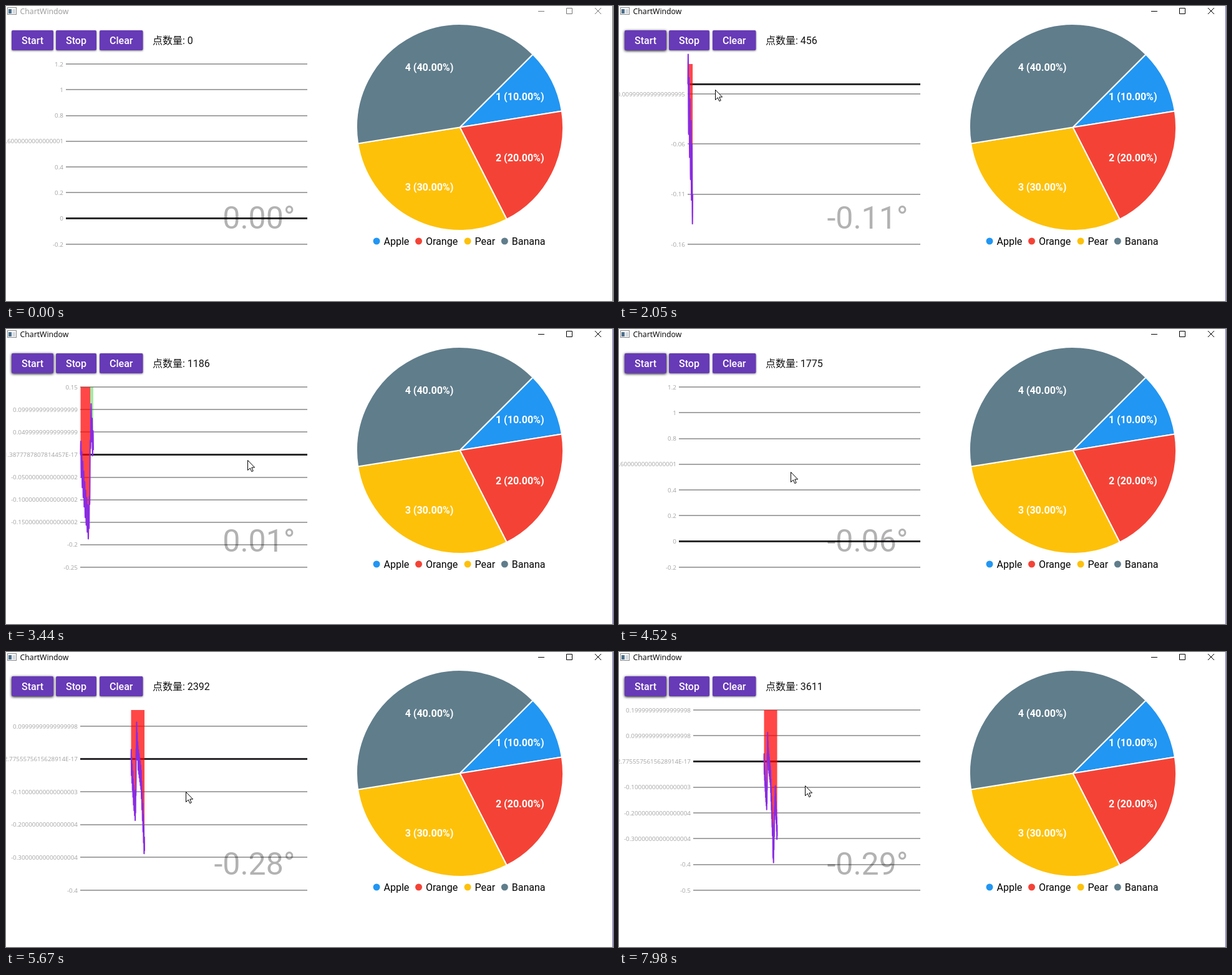
An HTML page for the animation above (8 s loop, 973 px wide and 473 px high).

```html
<!DOCTYPE html>
<html lang="en">
<head>
<meta charset="utf-8">
<title>ChartWindow</title>
<style>
html, body { margin: 0; width: 100%; height: 100%; overflow: hidden; background: #fff; }
svg { display: block; font: 16px Roboto, "Noto Sans CJK SC", "Noto Sans CJK", sans-serif; }
.ui { font-family: "Open Sans", "Noto Sans", sans-serif; }
.btn rect { fill: #673ab7; filter: drop-shadow(0 1px 1.5px rgba(0,0,0,.5)); }
.btn.hot rect { filter: drop-shadow(0 1px 2px rgba(0,0,0,.95)); }
.btn text { fill: #fff; font-weight: 500; text-anchor: middle; }
#title { font-size: 12.3px; }
#grid text { font-size: 9.85px; fill: #a3a3a3; text-anchor: end; }
#angle { font-size: 50px; fill: rgba(0,0,0,.3); text-anchor: end; }
#pie path { stroke: #fff; stroke-width: 2; stroke-linejoin: round; }
#pie .share { fill: #fff; font-weight: 700; text-anchor: middle; }
</style>
</head>
<body>
<svg width="973" height="473" viewBox="0 0 973 473">
  <rect x="2.5" y="2.5" width="14" height="11" fill="#fff" stroke="#858585"/>
  <rect x="4" y="5" width="5" height="7" fill="#4a6f8c"/>
  <rect x="10" y="5" width="5" height="7" fill="#d5dbe0"/>
  <text id="title" class="ui" x="22.5" y="13">ChartWindow</text>
  <path id="caption" fill="none" d="M853 8.5h10M898.5 3.5h9v9h-9zM944 3l10 10M954 3l-10 10"/>
  <path id="edge" d="M972.5 0V473"/>
  <g id="buttons"></g>
  <text id="count" x="235" y="61" fill="#111"></text>
  <g id="grid" class="ui"></g>
  <path id="fall" fill="rgba(255,0,0,.72)"/>
  <path id="rise" fill="rgba(0,190,0,.35)"/>
  <path id="line" fill="none" stroke="#8a2be2" stroke-width="2" stroke-linejoin="round"/>
  <text id="angle" x="463.5" y="356.5"></text>
  <g id="pie"></g>
  <path id="cursor" d="M.5 .5V16.5L4.3 13L6.8 18.6L9.2 17.5L6.8 12H11.6Z" fill="#fff" stroke="#000"/>
</svg>
<script>
const $ = id => document.getElementById(id);
const LOOP = 8000, FIRST = 290, STEP = 77, START = 1190;
const TOP = 93, BOTTOM = 382, RIGHT = 483;

// Time, point count, cursor x and y
const poses = [
  [290, 0, 771, 415], [980, 0, 46, 58], [START, 0, 46, 58], [2051, 456, 154, 134], [3437, 1186, 387, 210],
  [4515, 1775, 275, 229], [5670, 2392, 288, 224], [6594, 2880, 294, 220], [7980, 3611, 298, 214]
];

// Time and angle at the turning points of the trend
const trend = [
  [START, 0], [2051, -.11], [2690, -.164], [3010, .085], [3437, .01], [4515, -.06],
  [5670, -.28], [5960, -.394], [6594, -.22], [7000, -.12], [7980, -.29]
];

// Linear between rows; the swing fades to zero at each row
function at(rows, t, col = 1, swing = 0) {
  let i = 1;
  while (i < rows.length - 1 && rows[i][0] < t) i++;
  const a = rows[i - 1], b = rows[i], span = b[0] - a[0];
  const u = Math.min(1, Math.max(0, (t - a[0]) / span));
  return a[col] + (b[col] - a[col]) * u + swing * Math.sin(u * Math.PI * Math.round(span / 90));
}
const value = t => at(trend, t, 1, .035);

// Vertical scale; the labels come from repeated addition, rounding errors included
function scale(left, min, max, step) {
  const unit = (BOTTOM - TOP) / (max - min), y = v => BOTTOM - (v - min) * unit;
  const ticks = [];
  for (let v = min; v < max + step / 100; v += step) ticks.push(v);
  return { left, y, ticks };
}
const idle = scale(96, -.2, 1.2, .2);
const tight = scale(110, -.16, .02, .05);
const mid = scale(119, -.25, .1, .05);
const wide = scale(119, -.25, .15, .05);
const deep = scale(119, -.4, .15, .1);
const deeper = scale(119, -.5, .2, .1);

// From time, scale, x of the first point, pixels per ms (none: empty plot)
const views = [
  [0, idle], [1250, tight, 110.5, .0088], [2300, mid, 119.5, .0091], [2980, wide, 119.5, .0091],
  [4100, idle], [4900, deep, 200.5, .0048], [5900, deeper, 200.5, .0048],
  [6290, deeper, 245.5, .0025], [7440, deeper, 232.5, .0031]
];

function drawGrid({ left, y, ticks }) {
  const rule = (py, color, w) => `<path d="M${left} ${py}H${RIGHT}" stroke="${color}" stroke-width="${w}"/>`;
  $("grid").innerHTML = ticks.map(v =>
    rule(Math.round(y(v)), "#a5a5a5", 2) +
    `<text x="${left - 4}" y="${y(v) + 3.5}">${String(v).toUpperCase()}</text>`
  ).join("") + rule(Math.floor(y(0)) + .5, "#2b292b", 3);
}

function drawSeries(t, { y }, x0, rate) {
  const x = p => x0 + (p - START) * rate;
  const trace = (from, to) => {
    const pts = [];
    for (let p = from; p < to; p += 20) pts.push(x(p) + " " + y(value(p)));
    return [...pts, x(to) + " " + y(value(to))].join("L");
  };
  const area = (from, to) => rate && from < to ? `M${x(from)} ${TOP}L${trace(from, to)}L${x(to)} ${TOP}Z` : "";

  // The latest stretch above zero is green
  let turn = t;
  while (turn > START && at(trend, turn) > 0) turn -= 20;
  $("fall").setAttribute("d", area(START, turn));
  $("rise").setAttribute("d", area(turn, t));
  $("line").setAttribute("d", rate ? "M" + trace(START, t) : "");
}

function drawStatic() {
  $("buttons").innerHTML = [["Start", 9, 67], ["Stop", 80, 65], ["Clear", 150, 69.5]].map(([name, x, w]) =>
    `<g class="btn" id="${name}"><rect x="${x}" y="39" width="${w}" height="32" rx="2"/>
     <text x="${x + w / 2}" y="61">${name}</text></g>`).join("");

  const cx = 727.5, cy = 194.5, r = 165.5;
  const polar = (deg, radius) => {
    const a = deg * Math.PI / 180;
    return [cx + radius * Math.sin(a), cy - radius * Math.cos(a)];
  };
  // Name, colour, legend dot
  const slices = [["Apple", "#2196f3", 594], ["Orange", "#f44336", 661.5], ["Pear", "#fec109", 740], ["Banana", "#607d8b", 799.3]];
  let wedges = "", labels = "", angle = 45;
  slices.forEach(([name, color, dot], i) => {
    const n = i + 1, from = angle;
    angle += n * 36;
    const [x, y] = polar((from + angle) / 2, 108);
    wedges += `<path fill="${color}" d="M${cx} ${cy}L${polar(from, r)}A${r} ${r} 0 0 1 ${polar(angle, r)}Z"/>`;
    labels += `<text class="share" x="${x}" y="${y + 5.5}">${n} (${n}0.00%)</text>
      <circle cx="${dot}" cy="377" r="5.5" fill="${color}"/><text x="${dot + 11.5}" y="383">${name}</text>`;
  });
  $("pie").innerHTML = wedges + labels;
}

function draw(t) {
  const active = t >= START;
  const [, s, x0, rate] = views.filter(v => v[0] <= t).pop();
  drawGrid(s);
  drawSeries(t, s, x0, rate);
  $("count").textContent = "点数量: " + Math.round(at(poses, t));
  $("angle").textContent = (+value(t).toFixed(2) || 0).toFixed(2) + "°";
  $("title").setAttribute("fill", active ? "#000" : "#999");
  $("caption").setAttribute("stroke", active ? "#000" : "#777");
  $("edge").setAttribute("stroke", active ? "#7070c8" : "#686868");
  $("Start").classList.toggle("hot", t >= 950);
  $("cursor").style.display = t < FIRST ? "none" : "";
  $("cursor").setAttribute("transform", `translate(${Math.round(at(poses, t, 2))} ${Math.round(at(poses, t, 3))})`);
}

let last = -1;
function tick() {
  const t = performance.now() % LOOP;
  const shown = t < FIRST ? 0 : Math.max(FIRST, 280 + STEP * Math.floor((t - 278.5) / STEP));
  if (shown !== last) draw(last = shown);
  requestAnimationFrame(tick);
}

drawStatic();
tick();
</script>
</body>
</html>
```
